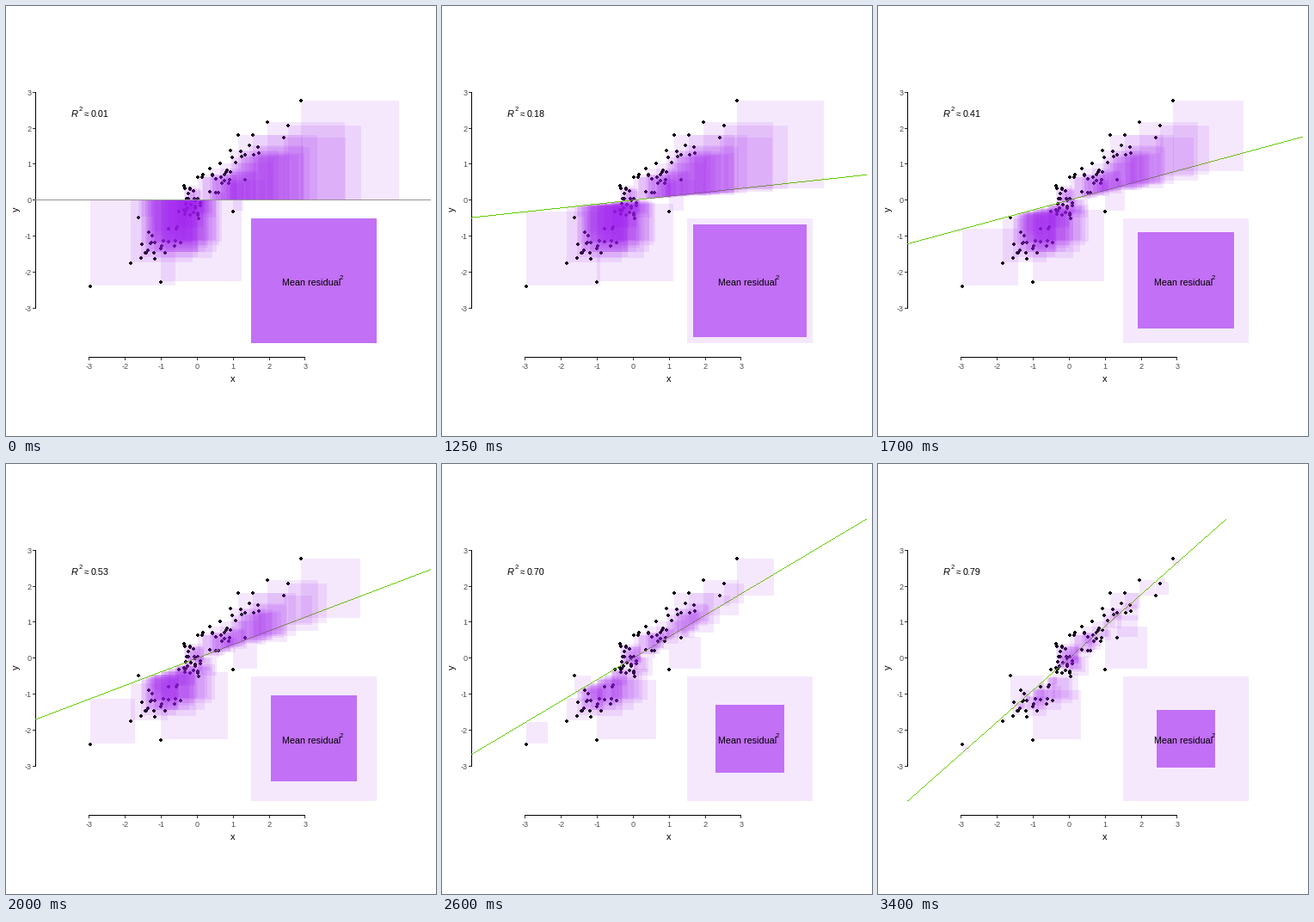
Write a matplotlib script that moves like this. It is 500x500 px and loops after 4400 ms.

```python
import numpy as np
import matplotlib.pyplot as plt
from matplotlib.animation import FuncAnimation
from matplotlib.collections import PolyCollection

plt.rcParams["font.family"] = "Liberation Sans"

SIZE, DPI = 500, 100
PX = 72 / DPI                        # one pixel in points
UNIT, X0, Y0 = 41.83, 222.4, 225.7   # pixels per data unit, position of the origin
X_MIN, X_MAX, Y_MAX = -4.5, 6.5, 3.875
STEPS, HOLD, FRAMES, INTERVAL = 49, 20, 88, 50
FINAL_SLOPE = 0.885
R2_START, R2_GAIN = 0.0055, 0.7805
PURPLE, GREEN, GREY, TICK = "#A020F0", "#66CD00", "#949494", "#333333"


def px(x):
    return X0 + UNIT * x


def py(y):
    return Y0 - UNIT * y


def boxes(left, top, right, bottom):
    """Corner lists of boxes given by their edges, as scalars or arrays."""
    x0, y0, x1, y1 = np.broadcast_arrays(*np.atleast_1d(left, top, right, bottom))
    corners = [(x0, y0), (x1, y0), (x1, y1), (x0, y1)]
    return np.array(corners, float).transpose(2, 0, 1)


def crisp_boxes(left, top, right, bottom):
    """Boxes on whole pixels, without their last column and row."""
    x0, y0, x1, y1 = (np.round(v) for v in (left, top, right, bottom))
    return boxes(x0, y0, np.maximum(x0, x1 - 1), np.maximum(y0, y1 - 1))


def make_points():
    """A few outlying points, then slanted clouds along the trend."""
    rng = np.random.default_rng(7)
    outliers = [(2.88, 2.76), (2.52, 2.07), (2.4, 1.74), (1.95, 2.17),
                (1.54, 1.81), (1.14, 1.81), (1.33, 0.57), (0.99, -0.32),
                (-1.64, -0.49), (-1.85, -1.75), (-1.02, -2.28), (-2.98, -2.4)]
    clouds = [  # centre x, centre y, half width, half height, slant, count
        (-0.95, -1.0, 0.6, 0.5, 0.6, 22),
        (-1.45, -1.5, 0.15, 0.08, 0.8, 4),
        (-0.15, -0.05, 0.25, 0.42, -0.3, 24),
        (0.5, 0.5, 0.5, 0.55, 0.8, 22),
        (1.3, 1.3, 0.45, 0.2, 0.3, 9),
    ]
    parts = [np.array(outliers)]
    for cx, cy, width, height, slant, count in clouds:
        dx, dy = rng.uniform(-1, 1, (2, count)) * [[width], [height]]
        parts.append(np.column_stack([cx + dx, cy + slant * dx + dy]))
    return np.vstack(parts).T


fig = plt.figure(figsize=(SIZE / DPI, SIZE / DPI), dpi=DPI, facecolor="white")
ax = fig.add_axes([0, 0, 1, 1])
ax.set(xlim=(0, SIZE), ylim=(SIZE, 0))
ax.axis("off")


def fill(verts, color, alpha=1, zorder=1):
    shapes = PolyCollection(verts, facecolors=color, alpha=alpha,
                            linewidths=0, zorder=zorder)
    ax.add_collection(shapes, autolim=False)
    return shapes


def label(x, y, s, size, color="black", **kw):
    kw = {"ha": "left", "va": "baseline", **kw}
    return ax.text(x, y, s, fontsize=size * PX, color=color, zorder=6, **kw)


def mean_box(side):
    cx, cy = px(3.25), py(-2.25)
    return crisp_boxes(cx - side / 2, cy - side / 2, cx + side / 2, cy + side / 2)


def draw_axes():
    left, bottom = 34, 408
    values = np.arange(-3, 4)
    cols, rows = np.floor(px(values)), np.floor(py(values))
    fill(boxes(left - 3, rows, left, rows + 1), TICK)
    fill(boxes(cols, bottom + 1, cols + 1, bottom + 4), TICK)
    fill(boxes(left, rows[-1], left + 1, rows[0] + 1), "black")
    fill(boxes(cols[0], bottom, cols[-1] + 1, bottom + 1), "black")
    for v in values:
        label(29.5, py(v) + 3.6, str(v), 9.2, "#4D4D4D", ha="right")
        label(px(v), 422.2, str(v), 9.2, "#4D4D4D", ha="center")
    label(264, 437, "x", 11, ha="center")
    label(12, 236, "y", 11, ha="center", va="center", rotation=90)


def draw_dots(x, y):
    cx, cy = np.round(x), np.round(y)
    for half_w, half_h in [(2, 1), (1, 2)]:
        fill(boxes(cx - half_w, cy - half_h, cx + half_w, cy + half_h),
             "black", zorder=2)


FULL_SIDE = 3.5 * UNIT
data_x, data_y = make_points()
xs, ys = px(data_x), py(data_y)

draw_axes()
draw_dots(xs, ys)
line = fill([], GREEN, zorder=2.5)
residuals = fill([], PURPLE, alpha=0.1, zorder=3)
fill(mean_box(FULL_SIDE), PURPLE, alpha=0.1, zorder=4)
mean_square = fill([], PURPLE, alpha=0.6, zorder=5)

label(321, 325, "Mean residual", 10.7)
label(387.6, 318, "2", 7.7)
label(75.3, 129, "R", 11, style="italic")
label(84.7, 122, "2", 7.7)
label(91.2, 129, "≈", 10)
r2_text = label(98.2, 129, "", 10.8)


def update(frame):
    step = min(max(frame - HOLD + 1, 0), STEPS)
    t = step / STEPS
    slope = FINAL_SLOPE * t
    gain = R2_GAIN * (1 - (1 - t) ** 2)

    # One pixel per column keeps the line hard-edged.
    x_end = min(X_MAX, Y_MAX / slope) if slope else X_MAX
    cols = np.arange(int(px(X_MIN)), int(px(x_end)))
    rows = np.floor(Y0 - slope * (cols + 0.5 - X0))
    line.set_verts(boxes(cols, rows, cols + 1, rows + 1))
    line.set_facecolor(GREEN if step else GREY)

    fitted = Y0 - slope * (xs - X0)
    residuals.set_verts(crisp_boxes(xs, np.minimum(ys, fitted),
                                    xs + abs(ys - fitted), np.maximum(ys, fitted)))

    mean_square.set_verts(mean_box(FULL_SIDE * np.sqrt(1 - gain)))
    r2_text.set_text(f"{R2_START + gain:.2f}")
    return line, residuals, mean_square, r2_text


anim = FuncAnimation(fig, update, frames=FRAMES, interval=INTERVAL,
                     repeat=True, repeat_delay=0)
plt.show()
```
